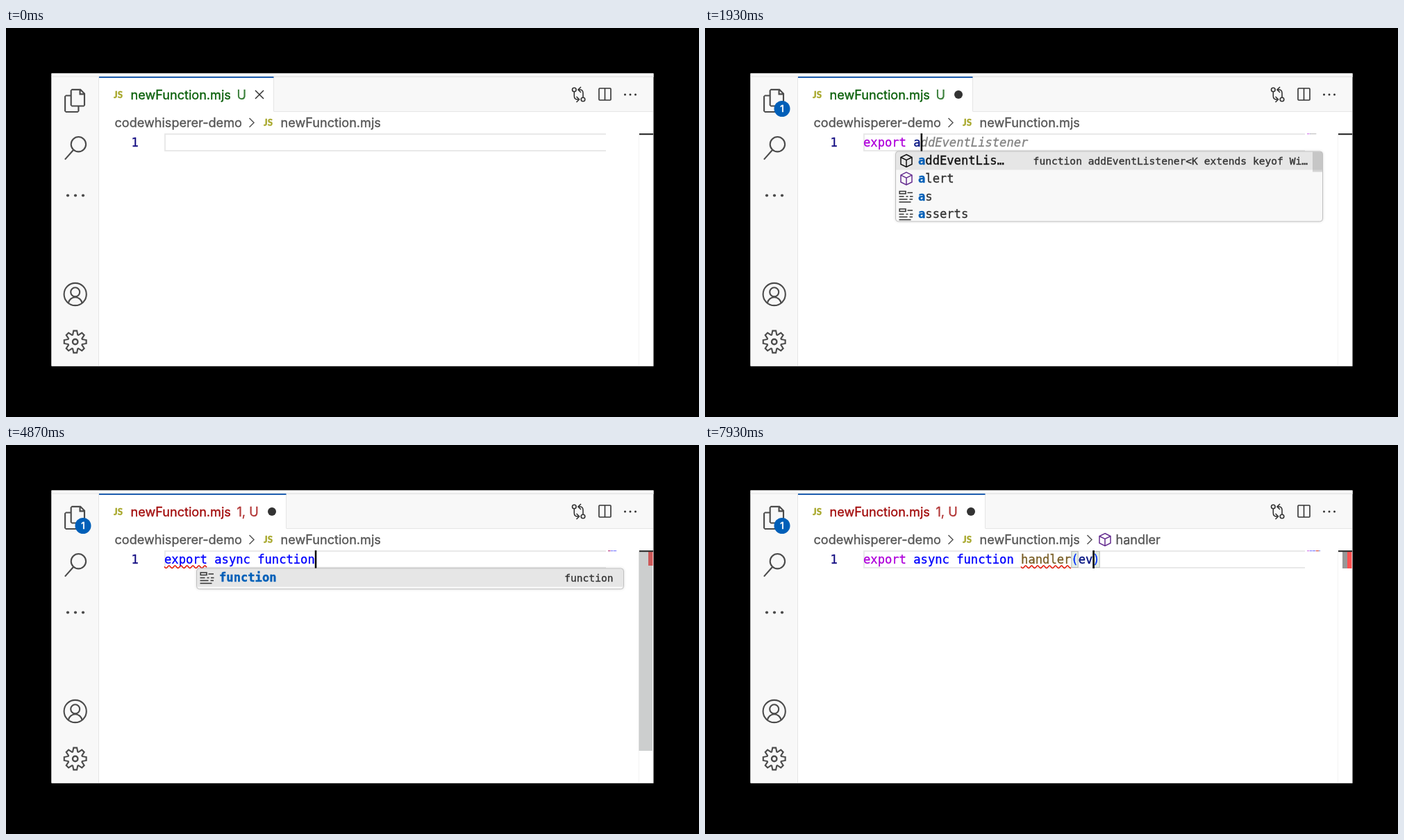
Animation of 998 by 561 pixels, one loop 8000 ms. Source, as an HTML page with a canvas:

```html
<!DOCTYPE html>
<html lang="en">
<head>
<meta charset="utf-8">
<title>Editor typing</title>
<style>
  html, body { margin: 0; width: 100%; height: 100%; overflow: hidden; background: #000; }
  canvas { display: block; }
</style>
</head>
<body>
<canvas id="stage" width="998" height="561"></canvas>
<script>
const c = document.getElementById('stage').getContext('2d');
const LOOP = 8000, CW = 10.323, X0 = 228, ROW = 25.7;
const MONO = '17.15px "DejaVu Sans Mono", monospace';
const SMALL = '14.6px "DejaVu Sans Mono", monospace';
const UI = '18.1px Inter, sans-serif';
const BLUE = '#005fb8', NAVY = '#001080', KEY = '#0000ff', PURPLE = '#af00db', INK = '#333', ICON = '#4b4b4b';

// Popup rows: icon, label with [matched] parts, detail
const list = (x, rows, thumb = 0, alpha = 0.4) => ({ x, rows, thumb, alpha });
const exportRow = n => ['key', `[${'export'.slice(0, n)}]${'export'.slice(n)}`, 'export'];
const asyncRow = n => ['key', `[${'async'.slice(0, n)}]${'async'.slice(n)}`, 'async'];
const funRows = n => {
  const low = `[${'function'.slice(0, n)}]${'function'.slice(n)}`;
  const rows = [['snippet', low, 'Function Statement'], ['key', low], ['var', low.replace('f', 'F')]];
  if (n < 3) rows.push(['cube', n < 2 ? '[f]ocus' : '[f]oc[u]s']);
  return list(275, rows, n < 3 ? 47 : 0);
};
const funStep = n => ({
  text: 'export async ' + 'function'.slice(0, n),
  ghost: 'function'.slice(n) + ' name(params) {', tail: '}', popup: funRows(n), cursor: 1
});
const typed = (text, more) => ({ text, ghost: '', tail: '', popup: null, cursor: 1, ...more });
const HEAD = 'export async function ';

const events = [
  [0, typed('', { cursor: 0, dirty: 0, errors: 0, wave: null, odd: 0, crumb: 0 })],
  [130, { cursor: 1 }],
  [670, typed('e', { dirty: 1 })],
  [730, { ghost: 'lse', popup: list(238, [['key', '[e]lse', 'else'], ['key', '[e]num'], ['key', '[e]xport'], ['key', '[e]xtends']], 40) }],
  [930, typed('ex', { ghost: 'port', popup: list(248, [exportRow(2), ['key', '[ex]tends'], ['old', 'external'], ['old', 'External']], 62) })],
  [1070, typed('exp', { ghost: 'ort', popup: list(259, [exportRow(3), ['var', 'Reg[Exp]'], ['var', 'XPath[Exp]ression']]) })],
  [1130, typed('expo', { ghost: 'rt', popup: list(269, [exportRow(4), ['var', 'XPath[Exp]ressi[o]n']]) })],
  [1530, typed('expor', { ghost: 't', popup: list(275, [exportRow(5)]) })],
  [1600, typed('export', { popup: list(275, [exportRow(6)]) })],
  [1730, typed('export ')],
  [1870, typed('export a')],
  [1930, { ghost: 'ddEventListener', popup: list(275, [
    ['dark', '[a]ddEventLis…', 'function addEventListener<K extends keyof Wi…'],
    ['cube', '[a]lert'], ['key', '[a]s'], ['key', '[a]sserts']], 29, 0.25) }],
  [2000, typed('export as', { popup: list(275, [['key', '[as]', 'as'], ['key', '[as]serts'], ['key', '[as]ync'], ['var', '[A]naly[s]erNode']], 40) })],
  [2470, { errors: 1, wave: [320, 331] }],
  [2530, { cursor: 0 }],
  [2870, typed('export asy', { ghost: 'nc', wave: [346, 357], popup: list(275, [
    asyncRow(3), ['var', '[A]nal[ys]erNode'], ['ns', 'Web[As]sembl[y]']], 80, 0.12) })],
  [3200, typed('export asyn', { ghost: 'c', popup: list(275, [asyncRow(4), ['var', '[A]naly[s]er[N]ode']]) })],
  [3400, typed('export async', { wave: null, popup: list(275, [asyncRow(5)]) })],
  [3530, typed('export async ')],
  [3870, { odd: 1, wave: [228, 289] }],
  [4000, { cursor: 0 }],
  [4200, typed('export async f')],
  [4270, funStep(1)],
  [4330, funStep(2)],
  [4400, funStep(3)],
  [4530, funStep(4)],
  [4600, funStep(5)],
  [4670, funStep(6)],
  [4730, funStep(7)],
  [4870, typed('export async function', { popup: list(275, [['key', '[function]', 'function']]) })],
  [5200, typed(HEAD)],
  [5600, { odd: 0, wave: [440, 457] }],
  [5670, { errors: 2 }],
  [5730, { cursor: 0 }],
  [5930, typed(HEAD + 'h')],
  [6070, typed(HEAD + 'ha')],
  [6200, typed(HEAD + 'han')],
  [6270, typed(HEAD + 'hand')],
  [6400, typed(HEAD + 'handl')],
  [6600, typed(HEAD + 'handle')],
  [6930, typed(HEAD + 'handler')],
  [7000, typed(HEAD + 'handler(', { after: ')' })],
  [7070, { errors: 3, wave: [455, 527] }],
  [7330, { errors: 1 }],
  [7400, { crumb: 1 }],
  [7470, { cursor: 0 }],
  [7870, typed(HEAD + 'handler(e')],
  [7930, typed(HEAD + 'handler(ev')]
];

function stateAt(t) {
  const s = { after: '' };
  for (const [time, change] of events) if (time <= t) Object.assign(s, change);
  return s;
}

const box = (x, y, w, h, color) => { c.fillStyle = color; c.fillRect(x, y, w, h); };
// The hairline outline gives the slightly heavier type of the editor
function write(str, x, y, color, font = UI, align = 'left') {
  c.font = font; c.fillStyle = c.strokeStyle = color; c.textAlign = align;
  c.lineWidth = 0.35;
  c.fillText(str, x, y);
  c.strokeText(str, x, y);
}
function stroke(d, color, width = 1.5, x = 0, y = 0) {
  c.save();
  c.translate(x, y);
  c.strokeStyle = color; c.lineWidth = width;
  c.stroke(new Path2D(d));
  c.restore();
}
function glyph(d, x, y) {
  c.save();
  c.translate(x, y);
  c.scale(1.43, 1.43);
  c.fillStyle = ICON;
  c.fill(new Path2D(d), 'evenodd');
  c.restore();
}
function disc(x, y, r, color, line) {
  c.beginPath(); c.arc(x, y, r, 0, Math.PI * 2);
  if (line) { c.lineWidth = line; c.strokeStyle = color; c.stroke(); }
  else { c.fillStyle = color; c.fill(); }
}
const cube = (x, y, color) =>
  stroke('M0-9 8-5V5L0 9-8 5V-5ZM-8-5 0-1 8-5M0-1V9', color, 1.5, x, y);

function gear(x, y) {
  c.beginPath();
  for (let k = 0; k < 8; k++)
    for (const [da, r] of [[-0.34, 10.7], [-0.15, 16.1], [0.15, 16.1], [0.34, 10.7]]) {
      const a = k * Math.PI / 4 + da;
      c.lineTo(x + r * Math.cos(a), y + r * Math.sin(a));
    }
  c.closePath();
  c.lineWidth = 2.1; c.strokeStyle = ICON; c.stroke();
  disc(x, y, 3.7, ICON, 2.4);
}

function sidebar(dirty) {
  glyph('M17.5 0h-9L7 1.5V6H2.5L1 7.5v15L2.500 24h12L16 22.500V18h4.700L22 16.500v-12zM17.500 2.100 19.900 4.500H17.500zM14.500 22.500h-12v-15H7v9L8.500 18h6zM20.500 16.500h-12v-15H16V6h4.500z', 82.6, 87.8);
  if (dirty) {
    disc(111, 116.5, 11.5, BLUE);
    write('1', 111, 121.3, '#fff', '600 13px Inter, sans-serif', 'center');
  }
  disc(104.4, 167.7, 10.7, ICON, 2.1);
  stroke('M97.200 175.700 84.900 189.600', ICON, 2.1);
  for (const x of [89, 100, 111]) disc(x, 241.5, 2.1, ICON);
  disc(99.7, 384, 16.1, ICON, 2.1);
  disc(99.7, 380.8, 6.5, ICON, 2.1);
  stroke('M90 396.500A9.800 9.600 0 0 1 109.400 396.500', ICON, 2.1);
  gear(99.7, 452.5);
}

function header(s) {
  const dot = s.errors ? (s.errors > 1 ? 386 : 383) : 365, right = dot + 20.5;
  box(134, 71, 798, 50, '#f8f8f8');
  box(134, 70, 798, 1, '#e5e5e5');
  box(134, 120, 798, 1, '#e5e5e5');
  box(134, 71, right - 134, 51, '#fff');
  box(right - 0.5, 71, 1, 49, '#e5e5e5');
  box(134, 70, right - 134, 2, '#1f5fb0');
  const tone = s.errors ? '#a30d0d' : '#0a600a';
  const js = '800 13.3px Lato, sans-serif';
  write('JS', 155, 101, '#a8a82c', js);
  write('newFunction.mjs', 179.5, 102.5, tone);
  c.globalAlpha = 0.8;
  write(s.errors ? s.errors + ', U' : 'U', 332.5, 102.5, tone);
  c.globalAlpha = 1;
  if (s.dirty) disc(dot, 96, 6, INK);
  else stroke('M359 90 371 102M371 90 359 102', INK, 1.5);

  // toolbar
  disc(818.3, 89, 2.8, INK, 1.6);
  disc(831, 103, 2.8, INK, 1.6);
  stroke('M818.300 92V98Q818.300 103 823 103H824M821.500 99 825.500 103 821.500 107M831 100V94Q831 89 826.500 89H825M828 85 824 89 828 93', INK, 1.6);
  stroke('M855 87H870Q871 87 871 88V103Q871 104 870 104H855Q854 104 854 103V88Q854 87 855 87M862.500 87V104', INK, 1.6);
  for (const x of [891.5, 899, 906.5]) disc(x, 96, 1.5, INK);

  // breadcrumbs
  const grey = '#565656', chevron = 'M0-6.500 6.500 0 0 6.500';
  write('codewhisperer-demo', 156.5, 143, grey);
  stroke(chevron, grey, 1.5, 350.5, 136.5);
  write('JS', 371, 141, '#a8a82c', js);
  write('newFunction.mjs', 395.5, 143, grey);
  if (s.crumb) {
    stroke(chevron, grey, 1.5, 550.5, 136.5);
    cube(576, 136.5, '#652d90');
    write('handler', 591.5, 143, grey);
  }
}

// Splits the line into coloured runs
function runs(s) {
  const declared = s.text.startsWith('export async function');
  const whole = {
    export: s.odd ? KEY : PURPLE,
    async: s.odd && !declared ? NAVY : KEY,
    function: KEY
  };
  return (s.text + s.after).match(/\w+|\W/g)?.map(w =>
    [w, whole[w] || (/[()]/.test(w) ? '#0431fa' : declared && 'handler'.startsWith(w) ? '#795e26' : NAVY)]) || [];
}

function wave(x0, x1) {
  c.beginPath();
  for (let x = x0; x <= x1; x += 0.5)
    c.lineTo(x, 175.8 + 1.7 * Math.cos((x - x0 - 2.5) / 8.6 * Math.PI * 2));
  c.lineWidth = 1.5; c.strokeStyle = '#e51400'; c.stroke();
}

function codeLine(s) {
  box(228, 152, 636, 2, '#e9e9e9');
  box(228, 176, 636, 2, '#e9e9e9');
  box(228, 152, 2, 26, '#e9e9e9');
  write('1', 180.5, 170.7, '#171184', MONO);
  const end = X0 + s.text.length * CW;
  if (s.after)
    for (const x of [X0 + 29 * CW, end]) {
      box(x, 153, CW, 24, 'rgba(0,100,0,.1)');
      c.lineWidth = 1; c.strokeStyle = '#b9b9b9';
      c.strokeRect(x + 0.5, 153.5, CW - 1, 23);
    }
  let col = 0;
  const mini = (n, color) => {
    c.globalAlpha = 0.5;
    box(867 + col * 0.58, 152, n * 0.58, 1.2, color);
    c.globalAlpha = 1;
  };
  for (const [w, color] of runs(s)) {
    write(w, X0 + col * CW, 170.7, color, MONO);
    if (w !== ' ') mini(w.length, color);
    col += w.length;
  }
  write(s.ghost, end, 170.7, '#838383', 'italic ' + MONO);
  mini(s.ghost.length, '#888');
  write(s.tail, X0, 222, '#838383', 'italic ' + MONO);
  if (s.wave) {
    wave(...s.wave);
    col = (s.wave[0] - X0) / CW;
    mini((s.wave[1] - s.wave[0]) / CW, '#f00');
  }
  if (s.cursor) box(end, 152, 2.5, 26, '#000');
}

function icon(kind, x, y) {
  if (kind === 'key')
    stroke('M.7-7.500H9.500V-4H.7ZM12-5.500H19.500M0 0H7M10 0H13M15.500 0H20M0 4H12M15 4H19.500M0 8H17', INK, 1.5, x, y);
  else if (kind === 'var' || kind === 'old')
    stroke('M4-6H.8V6H4M16-6H19.200V6H16M5 0 10-4 15-2.500V1L10 4.500 5 3ZM5 0 10 1.500 15-2.500M10 1.500V4.500', '#1769c2', 1.5, x, y);
  else if (kind === 'cube' || kind === 'dark')
    cube(x + 10.5, y, kind === 'dark' ? '#111' : '#652d90');
  else if (kind === 'ns')
    write('{}', x, y + 5.5, INK, MONO);
  else {
    stroke('M2 7V-9H19V7', INK, 1.5, x, y);
    for (let i = 0; i < 6; i++) box(x + 1.5 + i * 3.2, y + 8, 1.8, 1.8, INK);
  }
}

function popup({ x, rows, thumb, alpha }) {
  const h = Math.min(101, rows.length * ROW + 4);
  c.save();
  c.beginPath(); c.roundRect(x - 0.5, 178, 615, h, 4);
  c.shadowColor = 'rgba(0,0,0,.16)'; c.shadowBlur = 4;
  c.fillStyle = '#f8f8f8'; c.fill();
  c.shadowColor = 'transparent';
  c.save();
  c.clip();
  box(x, 178.5, 615, 26, '#e6e6e6');
  rows.forEach(([kind, label, detail], i) => {
    const y = 191.5 + i * ROW, old = kind === 'old';
    icon(kind, x + 4.5, y);
    let tx = x + 32;
    label.split(/[[\]]/).forEach((part, k) => {
      write(part, tx, y + 5.8, k % 2 ? BLUE : old ? '#777' : i ? INK : '#111', (k % 2 ? 'bold ' : '') + MONO);
      tx += part.length * CW;
    });
    if (old) box(x + 32, y, label.length * CW, 1.4, '#777');
    if (detail) write(detail, x + (detail.endsWith('…') ? 593 : 599.5), y + 5, INK, SMALL, 'right');
  });
  if (thumb) box(x + 600, 178.5, 15, thumb, `rgba(100,100,100,${alpha})`);
  c.restore();
  c.beginPath(); c.roundRect(x - 0.5, 178, 615, h, 4);
  c.lineWidth = 1; c.strokeStyle = '#c0c0c0'; c.stroke();
  c.restore();
}

function ruler(s, t) {
  box(911, 152, 1, 335, '#f3f3f3');
  const shown = Math.max(0, Math.min(1, (t - 4170) / 130, (5270 - t) / 430));
  if (s.after) box(918, 153, 7, 25, '#979797');
  if (s.errors) box(925, 153, 6.5, shown > 0.3 ? 21 : 25, '#ff5050');
  if (shown) box(911.5, 152, 19.5, 289, `rgba(100,105,105,${0.35 * shown})`);
  box(912, 152, 20, 2.2, '#333');
}

function draw(t) {
  const s = stateAt(t);
  c.textBaseline = 'alphabetic';
  c.lineJoin = 'miter';
  box(0, 0, 998, 561, '#000');
  box(65.5, 65.5, 867, 422.3, '#fff');
  box(65.5, 65.5, 867, 5, '#f8f8f8');
  box(65.5, 70, 67.5, 417, '#f8f8f8');
  box(66, 69.5, 866.5, 1, '#e5e5e5');
  box(133, 70, 1, 417, '#e5e5e5');
  sidebar(s.dirty);
  header(s);
  codeLine(s);
  ruler(s, t);
  if (s.popup) popup(s.popup);
}

function tick() {
  draw(performance.now() % LOOP);
  requestAnimationFrame(tick);
}
tick();
</script>
</body>
</html>
```
